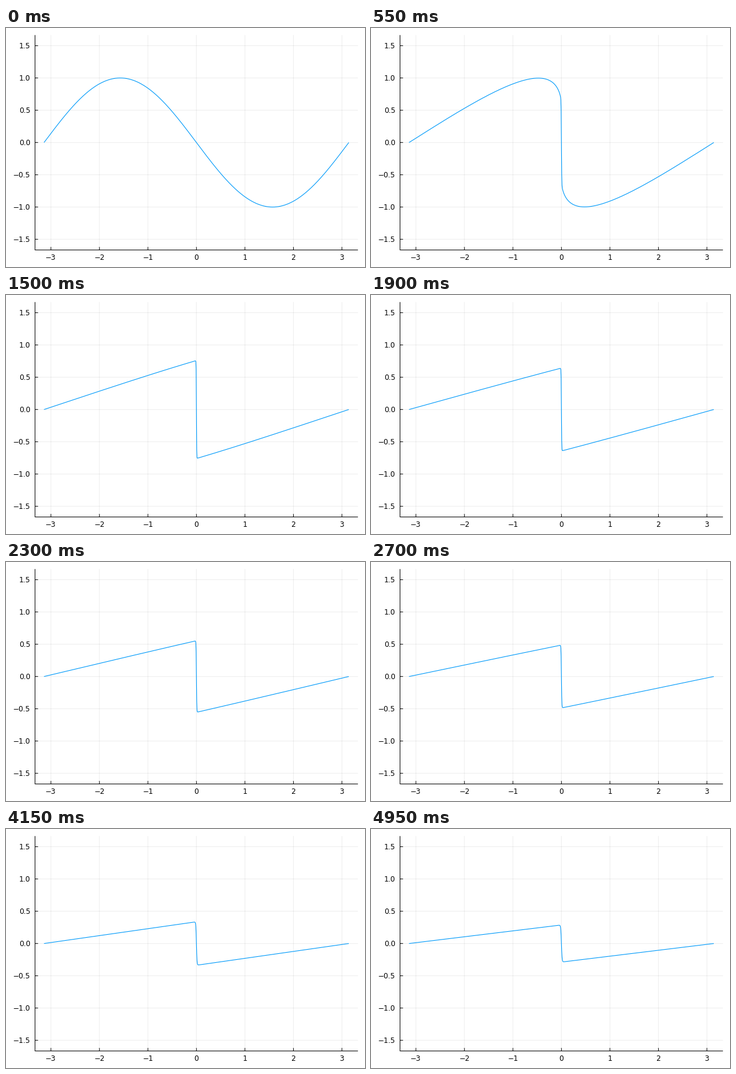
Recreate the animation shown at these times as a matplotlib script. Size 600 px wide and 400 px high, loop 5 s.

```python
import numpy as np
import matplotlib.pyplot as plt
from matplotlib.animation import FuncAnimation

W, H, DPI = 600, 400, 100
FRAMES, INTERVAL = 100, 50
DT = 0.1        # simulated time per frame
NU = 0.002      # viscosity

LEFT, RIGHT, TOP, BOTTOM = 48.3, 588.2, 11.8, 371.5
CX, CY = (LEFT + RIGHT) / 2, (TOP + BOTTOM) / 2
SX = (RIGHT - LEFT) / (2.12 * np.pi)
SY = (BOTTOM - TOP) / (1.06 * np.pi)


def px(x):
    return CX + SX * x


def py(y):
    return CY - SY * y


def pt(pixels):
    return pixels * 72 / DPI


# Viscous Burgers equation with u(x, 0) = -sin(x), solved by Cole-Hopf.
half = np.linspace(-np.pi, 0, 513)
nodes = np.linspace(-4.2, 4.2, 1200)
gap = half[:, None] - nodes
gap_sq = gap ** 2
full_x = np.concatenate([half, -half[-2::-1]])


def burgers(t):
    if t == 0:
        return -np.sin(full_x)
    g = np.cos(nodes) + gap_sq / (2 * t)
    g -= g.min(axis=1, keepdims=True)
    weight = np.exp(-g / (2 * NU))
    u = (weight * gap).sum(axis=1) / (t * weight.sum(axis=1))
    u[0] = u[-1] = 0
    return np.concatenate([u, -u[-2::-1]])


fig = plt.figure(figsize=(W / DPI, H / DPI), dpi=DPI, facecolor="white")
ax = fig.add_axes([0, 0, 1, 1])
ax.set_xlim(0, W)
ax.set_ylim(H, 0)
ax.axis("off")


def segment(xs, ys, **style):
    ax.plot(xs, ys, color="black", lw=pt(1), snap=False,
            solid_capstyle="butt", **style)


def label(x, baseline, text, ha):
    ax.text(x, baseline, text.replace("-", "\u2212"), ha=ha, va="baseline",
            family="DejaVu Sans", size=pt(12), color="black")


AXIS_X, AXIS_Y = 48.5, 371.5

for v in range(-3, 4):
    x = px(v)
    segment([x, x], [TOP, BOTTOM], alpha=0.07, zorder=1)
    segment([x, x], [AXIS_Y, AXIS_Y - 5], zorder=3)
    label(x, 387.8, str(v), "center")

for v in np.arange(-1.5, 1.6, 0.5):
    y = py(v)
    segment([LEFT, RIGHT], [y, y], alpha=0.07, zorder=1)
    segment([AXIS_X, AXIS_X + 5], [y, y], zorder=3)
    label(40.7, y + 4.4, f"{v:.1f}", "right")

segment([AXIS_X, AXIS_X], [TOP, AXIS_Y + 0.5], zorder=3)
segment([AXIS_X - 0.5, RIGHT], [AXIS_Y, AXIS_Y], zorder=3)

curve, = ax.plot([], [], color="#009AFA", lw=pt(1.1), snap=False,
                 solid_joinstyle="round", solid_capstyle="butt", zorder=4)


def update(i):
    curve.set_data(px(full_x), py(burgers(i * DT)))
    return curve,


anim = FuncAnimation(fig, update, frames=FRAMES, interval=INTERVAL,
                     repeat=True, repeat_delay=0, blit=False)
plt.show()
```
